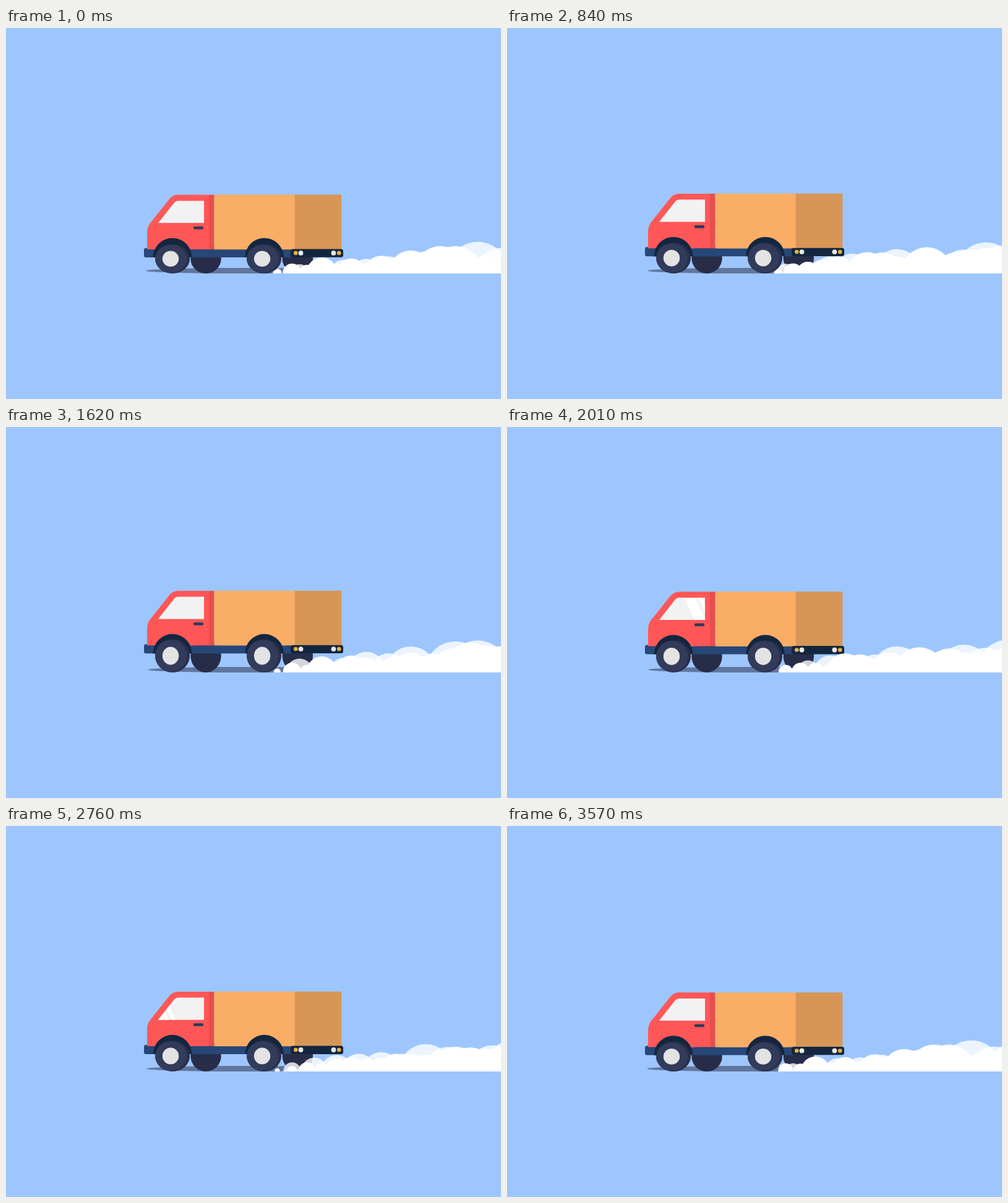
An HTML page with a canvas for the animation above (3600 ms loop, 800x600 px).

```html
<!DOCTYPE html>
<html>
<head>
<meta charset="utf-8">
<title>Delivery truck</title>
<style>
  html, body { margin: 0; width: 100%; height: 100%; overflow: hidden; background: #9dc6ff; }
  canvas { display: block; }
</style>
</head>
<body>
<canvas id="stage" width="800" height="600"></canvas>
<script>
const ctx = document.getElementById('stage').getContext('2d');
const LOOP = 3600, BOUNCE = 300, GROUND = 397;
const NAVY = '#13263f';

const cab = new Path2D('M228 358V331Q228 320 236 312L263 278Q269 269.8 278 269.8H329V358Z');
const glass = new Path2D('M246 315.3L271 283.5Q274 279.4 279 279.4H320V315.3Z');

function fill(path, color) {
  ctx.fillStyle = color;
  ctx.fill(path);
}

function rect(x, y, w, h, color, radius = 0) {
  const path = new Path2D();
  path.roundRect(x, y, w, h, radius);
  fill(path, color);
}

function ellipse(x, y, rx, ry, color, from = 0, to = Math.PI * 2) {
  const path = new Path2D();
  path.ellipse(x, y, rx, ry, 0, from, to);
  fill(path, color);
}

// Repeatable random number in 0..1
function random(n) {
  const v = Math.sin(n * 127.1 + 11.7) * 43758.5453;
  return v - Math.floor(v);
}

function drawShine(t) {
  ctx.save();
  ctx.clip(glass);
  const left = 303 - (t - 2010) * 0.077;
  for (const [offset, width] of [[0, 18], [23, 6]]) {
    const x = left + offset;
    fill(new Path2D(`M${x - 17} 279L${x} 316h${width}l-17 -37Z`), '#fff');
  }
  ctx.restore();
}

function drawBody(t, lift) {
  ctx.save();
  ctx.translate(0, -lift);
  rect(223, 356, 22, 15, '#274778', 3);
  rect(236, 358, 228, 13, '#274778');
  fill(cab, '#ff5757');
  rect(328, 269.8, 8.6, 88.2, '#e64e50');
  rect(336.5, 269.6, 130.5, 88.6, '#faad65');
  rect(466.7, 269.6, 75.6, 88.6, '#d79656');
  fill(glass, '#f2f2f2');
  drawShine(t);
  rect(302.8, 320.9, 16.4, 4.7, '#2f3a5b', 2.3);
  for (const x of [269, 417.5]) ellipse(x, 371, 31.3, 31.3, NAVY, Math.PI, 0);
  rect(460, 357.5, 85, 13.3, NAVY, 3.5);
  for (const x of [468.2, 538.2]) ellipse(x, 363.9, 3.3, 3.3, '#e9b03c');
  for (const x of [476.5, 529.4]) ellipse(x, 363.9, 3.9, 3.9, '#e8e8e8');
  ctx.restore();
}

function drawPuffs(t, gap, minSize, maxSize, seed, color) {
  for (let i = 0; i < LOOP / gap; i++) {
    const age = (t - i * gap + LOOP) % LOOP;
    if (age > 1080) continue;
    const size = minSize + (maxSize - minSize) * random(i + seed);
    const r = (6 + 46 * Math.sqrt(age / 900)) * size;
    ellipse(438 + age * 0.4, GROUND - 1, r, r, color);
  }
}

function drawSmoke(t) {
  ctx.save();
  ctx.beginPath();
  ctx.rect(0, 0, 800, GROUND);
  ctx.clip();
  ctx.filter = 'blur(0.7px)';
  drawPuffs(t, 90, 0.6, 1.05, 300, 'rgba(255,255,255,0.8)');
  drawPuffs(t, 60, 0.4, 0.96, 0, '#fff');
  fill(new Path2D('M428 399L470 394L560 384L810 378V399Z'), '#fff');
  ctx.restore();
}

function drawWheel(x, radius) {
  const y = GROUND - radius;
  ellipse(x, y, 28, radius, '#292f4b');
  ellipse(x - 2.2, y, 25.6, radius * 0.95, '#323b5a');
  ellipse(x - 3, y, 13.2, radius * 0.535, '#e3e3e3');
}

function draw(t) {
  const up = (1 - Math.cos(t / BOUNCE * Math.PI * 2)) / 2;
  const radius = 23.8 + 3.5 * up;
  ctx.fillStyle = '#9dc6ff';
  ctx.fillRect(0, 0, 800, 600);
  ellipse(385, 392.5, 159 - 4 * up, 4.5, '#61769f');
  for (const x of [323, 471.3]) ellipse(x, GROUND - radius, 24.7, radius, '#272d48');
  drawBody(t, 5.3 * up);
  drawSmoke(t);
  for (const x of [269, 417]) drawWheel(x, radius);
}

function tick() {
  draw(performance.now() % LOOP);
  requestAnimationFrame(tick);
}
tick();
</script>
</body>
</html>
```
